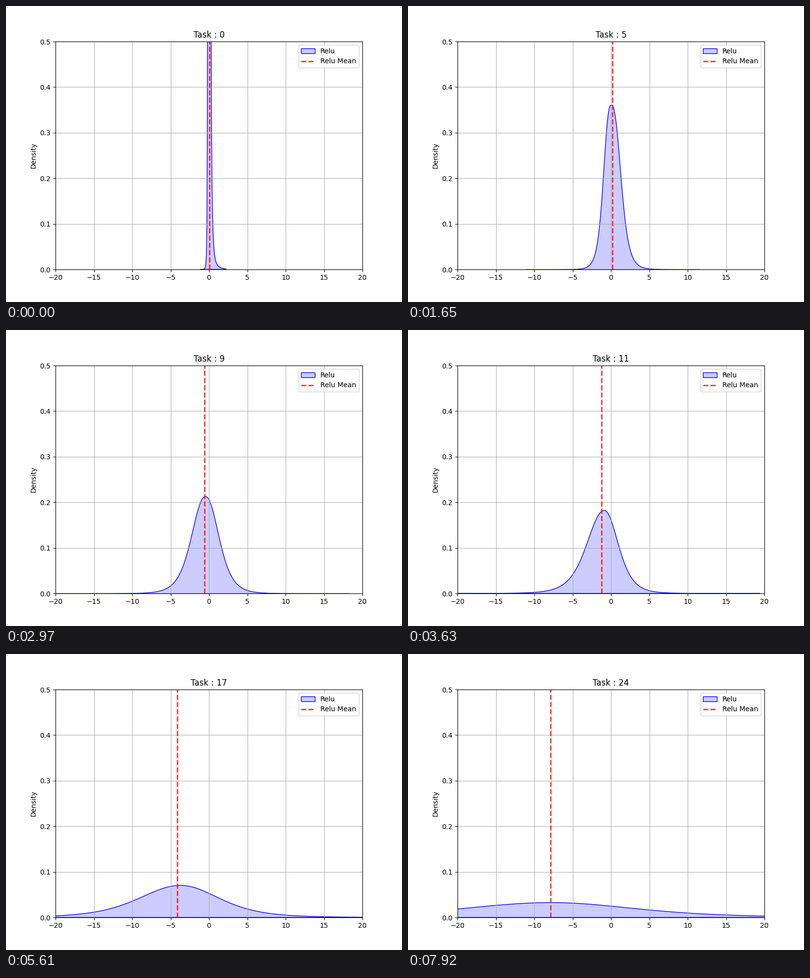
Animation, 800 px wide and 600 px high, one loop 8 s. Source, as a matplotlib script:

```python
import numpy as np
import matplotlib.pyplot as plt
from matplotlib.animation import FuncAnimation

LOOP, STEP, TICK = 8000, 330, 40  # ms

# Key tasks; everything between them is interpolated
KEYS = [0, 3, 7, 11, 17, 20, 24]
LEFT = [0.18, 1.01, 2.9, 5.0, 12.4, 21.7, 26.8]
RIGHT = [0.147, 1.37, 3.36, 4.0, 11.6, 22.7, 25.2]
PEAK_X = [0.03, 0.1, -0.1, -0.87, -3.7, -7.2, -7.8]
MEAN_X = [0.08, 0.27, 0.08, -1.21, -4.1, -6.68, -7.85]


def blend(values, task):
    return np.interp(task, KEYS, values)


def blend_log(values, task):
    return np.exp(blend(np.log(values), task))


def density(task):
    """Two-sided bell with power-law tails, scaled to unit area."""
    peak_x = blend(PEAK_X, task)
    left, right = blend_log(LEFT, task), blend_log(RIGHT, task)
    x = np.linspace(peak_x - 6.5 * left, peak_x + 1.5 + 4.7 * right, 200)

    # The top grows rounder and the right tail lighter as tasks go by
    power = 2 + np.exp(1 - task / 3)
    tail = np.where(x < peak_x, 6, 6 - 3.2 * np.exp(-task))
    u = np.abs(x - peak_x) / np.where(x < peak_x, left, right)
    y = (1 + u ** power) ** (-tail / power)
    return x, y / (y.sum() * (x[1] - x[0]))


fig, ax = plt.subplots(figsize=(8, 6), dpi=100)
area = ax.fill_between(*density(0), facecolor=(0, 0, 1, 0.2),
                       edgecolor=(0, 0, 1, 1), linewidth=1, label="Relu")
mean_line = ax.axvline(MEAN_X[0], color="red", alpha=0.8, linestyle="--",
                       linewidth=2, label="Relu Mean")
ax.set_xlim(-20, 20)
ax.set_ylim(0, 0.5)
ax.set_ylabel("Density")
ax.grid(True)
ax.legend(loc="upper right")
title = ax.set_title("Task : 0")


def update(i):
    task = (i * TICK + TICK - 1) // STEP
    x, y = density(task)
    curve = np.column_stack([x, y])
    area.set_verts([np.vstack([(x[0], 0), curve, (x[-1], 0)])])
    mean = blend(MEAN_X, task)
    mean_line.set_xdata([mean, mean])
    title.set_text(f"Task : {task}")
    return area, mean_line, title


anim = FuncAnimation(fig, update, frames=LOOP // TICK, interval=TICK,
                     repeat=True, repeat_delay=0, blit=False)
plt.show()
```
